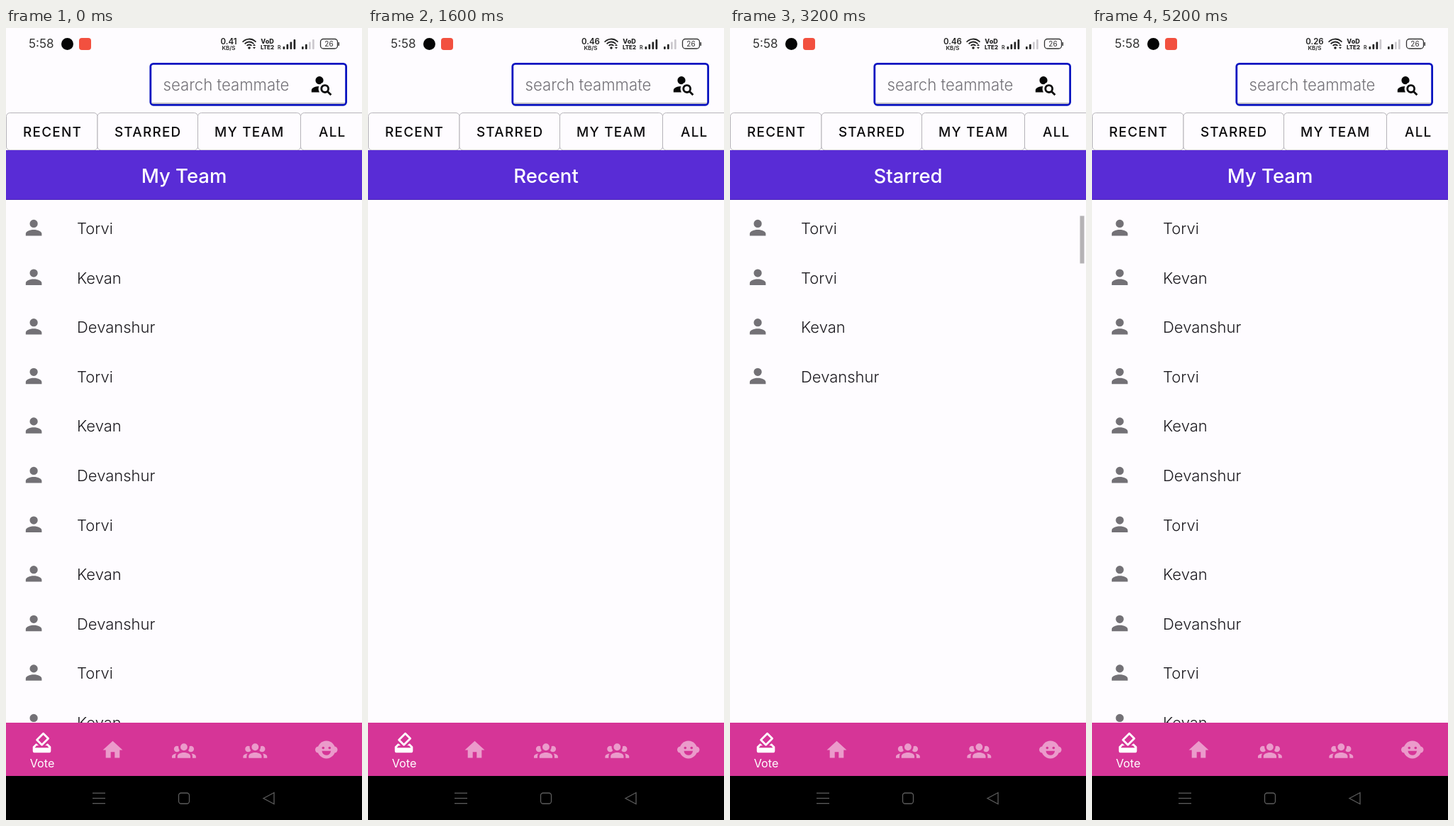
An HTML page with a canvas for the animation above (5.3 s loop, 502 by 1115 pixels).

```html
<!DOCTYPE html>
<html lang="en">
<head>
<meta charset="utf-8">
<title>Team list</title>
<style>
html, body { margin: 0; width: 100%; height: 100%; overflow: hidden; background: #fefcff; }
canvas { display: block; width: 502px; height: 1115px; }
</style>
</head>
<body>
<canvas id="stage"></canvas>
<script>
const W = 502, H = 1115, LOOP = 5300;
const TOP = 172, BOTTOM = 978, ROW = 69.6;
const PAPER = '#fefcff', PINK = '#d63597', PALE = '#eb9bcb';
const FONT = 'Inter, Roboto, sans-serif';

const canvas = document.getElementById('stage');
const ctx = canvas.getContext('2d');
const dpr = window.devicePixelRatio || 1;
canvas.width = W * dpr;
canvas.height = H * dpr;

const icons = {
  person: 'M12 4a4 4 0 0 1 0 8a4 4 0 0 1 0-8m0 10c4.42 0 8 1.79 8 4v2H4v-2c0-2.21 3.58-4 8-4Z',
  find: 'M15.5 12C18 12 20 14 20 16.5C20 17.38 19.75 18.21 19.31 18.9L22.39 22L21 23.39L17.88 20.32C17.19 20.75 16.37 21 15.5 21C13 21 11 19 11 16.5C11 14 13 12 15.5 12M15.5 14A2.5 2.5 0 0 0 15.5 19A2.5 2.5 0 0 0 15.5 14M10 4A4 4 0 0 1 14 8C14 8.91 13.69 9.75 13.18 10.43C12.32 10.75 11.55 11.26 10.91 11.9L10 12A4 4 0 0 1 10 4M2 20V18C2 15.88 5.31 14.14 9.5 14C9.18 14.78 9 15.62 9 16.5C9 17.79 9.38 19 10 20Z',
  vote: 'M18 13h-.68l-2 2h1.91L19 17H5l1.78-2h2.05l-2-2H6l-3 3v4a2 2 0 0 0 2 2h14a2 2 0 0 0 2-2v-4l-3-3m-1-5.05l-4.95 4.95l-3.54-3.54l4.95-4.95L17 7.95m-4.24-5.66L6.39 8.66a1 1 0 0 0 0 1.41l4.95 4.95a1 1 0 0 0 1.41 0l6.36-6.36a1 1 0 0 0 0-1.41L14.16 2.3a1 1 0 0 0-1.4-.01Z',
  home: 'M10 20v-6h4v6h5v-8h3L12 3L2 12h3v8Z',
  group: 'M12 5.5A3.5 3.5 0 0 1 12 12.5A3.5 3.5 0 0 1 12 5.5M5 8C5.56 8 6.08 8.15 6.53 8.42C6.38 9.85 6.8 11.27 7.66 12.38C7.16 13.34 6.16 14 5 14A3 3 0 0 1 5 8M19 8A3 3 0 0 1 19 14C17.84 14 16.84 13.34 16.34 12.38C17.2 11.27 17.62 9.85 17.47 8.42C17.92 8.15 18.44 8 19 8M5.5 18.25C5.5 16.18 8.41 14.5 12 14.5C15.59 14.5 18.5 16.18 18.5 18.25V20H5.5ZM0 20V18.5C0 17.11 1.89 15.94 4.45 15.6C3.86 16.28 3.5 17.22 3.5 18.25V20ZM24 20H20.5V18.25C20.5 17.22 20.14 16.28 19.55 15.6C22.11 15.94 24 17.11 24 18.5Z'
};
for (const k in icons) icons[k] = new Path2D(icons[k]);

const names = ['Torvi', 'Kevan', 'Devanshur'];
const sections = [
  { title: 'Recent', rows: 15, lead: 0 },
  { title: 'Starred', rows: 19, lead: 1 },
  { title: 'My Team', rows: 30, lead: 0 }
];
let offset = 0;
for (const s of sections) {
  s.y = offset;
  offset += ROW * (s.rows + 1);
}

const tabs = [
  { label: 'RECENT', x: 0.5, w: 128.5, tx: 24 },
  { label: 'STARRED', x: 129, w: 141.5, tx: 153 },
  { label: 'MY TEAM', x: 270.5, w: 145, tx: 294 },
  { label: 'ALL', x: 415.5, w: 110, tx: 441 }
];

// Each tap: section reached, start of the scroll, moment the scrollbar goes
const taps = [
  { to: 0, start: 1044.2, hide: 1590, touch: [65, 154] },
  { to: 1, start: 2941, hide: 3390, touch: [185, 158] },
  { to: 2, start: 4402.7, hide: 4990 }
];
const GLIDE = 250;

const clamp = v => Math.max(0, Math.min(1, v));
const ease = p => (1 - Math.cos(Math.PI * clamp(p))) / 2;

function scrollAt(t) {
  let y = sections[2].y;
  for (const tap of taps) y += (sections[tap.to].y - y) * ease((t - tap.start) / GLIDE);
  return y;
}

// Part of the list that is mounted, in content pixels
function mounted(t) {
  if (t < 1590) return [1700, Infinity];
  if (t < 2600) return [0, ROW];
  if (t < 2700) return [0, ROW * 11];
  if (t < 3800) return [0, sections[1].y + ROW * 5];
  if (t < 5200) return [0, sections[2].y + ROW * 2];
  return [0, Infinity];
}

function pressAlpha(dt) {
  if (dt < -50 || dt > 180) return 0;
  if (dt < 10) return 0.29 * (dt + 50) / 60;
  if (dt < 70) return 0.29;
  return 0.29 * Math.pow(1 - (dt - 70) / 110, 1.3);
}

function text(str, x, y, size, color, weight = 400, align = 'left', spacing = 0) {
  ctx.font = `${weight} ${size}px ${FONT}`;
  ctx.fillStyle = color;
  ctx.textAlign = align;
  ctx.letterSpacing = spacing + 'px';
  ctx.fillText(str, x, y);
}

function box(x, y, w, h, color) {
  ctx.fillStyle = color;
  ctx.fillRect(x, y, w, h);
}

function round(x, y, w, h, r, fill, stroke, line = 1) {
  ctx.beginPath();
  ctx.roundRect(x, y, w, h, r);
  if (fill) { ctx.fillStyle = fill; ctx.fill(); }
  if (stroke) { ctx.strokeStyle = stroke; ctx.lineWidth = line; ctx.stroke(); }
}

function disc(x, y, r, color) {
  ctx.beginPath();
  ctx.arc(x, y, r, 0, 7);
  ctx.fillStyle = color;
  ctx.fill();
}

function poly(points, color, line) {
  ctx.beginPath();
  points.forEach(p => ctx.lineTo(...p));
  ctx.closePath();
  if (line) { ctx.strokeStyle = color; ctx.lineWidth = line; ctx.stroke(); }
  else { ctx.fillStyle = color; ctx.fill(); }
}

function icon(name, x, y, scale, color) {
  ctx.save();
  ctx.translate(x, y);
  ctx.scale(scale, scale);
  ctx.fillStyle = color;
  ctx.fill(icons[name], 'evenodd');
  ctx.restore();
}

function bars(x, lit) {
  for (let i = 0; i < 4; i++) {
    const h = 4 + i * 3.3;
    round(x + i * 5, 30 - h, 2.7, h, 1, i < lit ? '#222' : '#ccc9ce');
  }
}

function drawStatus(t) {
  text('5:58', 32, 28, 17, '#333');
  disc(86.5, 22.5, 8.5, '#050505');
  round(103, 14, 17, 17, 4, '#f2503f');
  const rate = t < 1600 ? '0.41' : t < 3600 ? '0.46' : '0.26';
  text(rate, 314, 22.5, 11.5, '#222', 600, 'center');
  text('KB/S', 314, 30.5, 8, '#222', 600, 'center');

  ctx.strokeStyle = '#222';
  ctx.lineWidth = 1.8;
  for (const r of [4.5, 8.5, 12.5]) {
    ctx.beginPath();
    ctx.arc(343, 28, r, -Math.PI * 0.77, -Math.PI * 0.23);
    ctx.stroke();
  }
  disc(343, 28, 1.8, '#222');
  poly([[348, 25], [350, 22.5], [352, 25]], '#222');
  poly([[348, 27], [350, 29.5], [352, 27]], '#222');

  text('VoD', 368.5, 22, 9, '#222', 800, 'center');
  text('LTE2', 368.5, 30, 8, '#222', 800, 'center');
  text('R', 383, 30, 7, '#222', 600);
  bars(390.5, t < 4500 ? 4 : 3);
  bars(417, 2);
  round(443.5, 15.5, 24, 13.5, 4, null, '#333', 1.3);
  round(468.5, 20, 1.5, 5, 0.5, '#333');
  text('26', 455.5, 26, 10, '#333', 400, 'center');
}

function drawSearch() {
  round(203.8, 50.3, 275.8, 58, 4, PAPER, '#0a14c0', 2.8);
  box(205.5, 105.5, 272.5, 1, '#85838c');
  text('search teammate', 221.5, 87.5, 22.2, '#737177', 300);
  icon('find', 428, 62.5, 1.4, '#080808');
}

function drawTabs(t) {
  for (const tab of tabs) round(tab.x, 119.5, tab.w, 52.5, 5, PAPER, '#b5b3b8');
  for (const tap of taps) {
    const a = tap.touch ? pressAlpha(t - tap.start) : 0;
    const tab = tabs[tap.to];
    if (a > 0) round(tab.x, 119.5, tab.w, 52.5, 5, `rgba(0,0,0,${a})`);
  }
  for (const tab of tabs) text(tab.label, tab.tx, 153, 18.9, '#0c0b0d', 500, 'left', 1.25);
}

function drawHeader(title, y) {
  box(0, y, W, 70, '#592cd6');
  box(0, y + 69, W, 1, '#4a25b4');
  text(title, W / 2, y + 46, 27.5, '#fff', 500, 'center');
}

function drawList(t) {
  const pos = scrollAt(t), [lo, hi] = mounted(t);
  ctx.save();
  ctx.beginPath();
  ctx.rect(0, TOP, W, BOTTOM - TOP);
  ctx.clip();
  for (const s of sections) {
    for (let i = 0; i < s.rows; i++) {
      const at = s.y + ROW * (i + 1), y = TOP + at - pos;
      if (at < lo || at + ROW > hi + 1 || y < TOP - 30 || y > BOTTOM) continue;
      const name = names[i < s.lead ? 0 : (i - s.lead) % 3];
      icon('person', 22.2, y + 22.6, 1.41, '#737176');
      text(name, 100, y + 48.4, 22, '#1d1b20', 300);
    }
  }
  sections.forEach((s, k) => {
    let y = TOP + s.y - pos;
    if (y < TOP) {
      const next = sections[k + 1];
      y = next ? Math.min(TOP, TOP + next.y - pos - ROW) : TOP;
    }
    if (y > TOP - ROW && y < BOTTOM) drawHeader(s.title, y);
  });
  if (taps.some(p => t > p.start && t < p.hide)) {
    box(493.5, TOP + scrollAt(t - 7) / 12.04, 6, 67, 'rgba(0,0,0,.29)');
  }
  ctx.restore();
}

function drawTouch(t) {
  for (const { touch, start } of taps) {
    const dt = t - start;
    if (!touch || dt < -50 || dt > 90) continue;
    disc(...touch, 15, 'rgba(255,255,255,.17)');
    ctx.strokeStyle = 'rgba(255,255,255,.12)';
    ctx.lineWidth = 1.5;
    ctx.stroke();
  }
}

function drawNav() {
  box(0, BOTTOM, W, 75, PINK);
  icon('vote', 33.5, 989, 1.42, '#fff');
  text('Vote', 51, 1041, 16.2, '#fff', 400, 'center');
  icon('home', 133.7, 999.6, 1.4, PALE);
  icon('group', 234, 999.5, 1.41, PALE);
  icon('group', 334.4, 999.5, 1.41, PALE);

  disc(440.5, 1016, 4.5, PALE);
  disc(463, 1016, 4.5, PALE);
  disc(451.8, 1016, 12.5, PALE);
  disc(447.3, 1013.5, 1.8, PINK);
  disc(456.3, 1013.5, 1.8, PINK);
  ctx.beginPath();
  ctx.arc(451.8, 1017.5, 6.3, 0.05, Math.PI - 0.05);
  ctx.fillStyle = PINK;
  ctx.fill();

  box(0, 1053, W, 62, '#000');
  for (const y of [1076.5, 1083.8, 1091]) box(122, y, 18, 1.3, '#5c5c5c');
  round(243.5, 1077, 15, 15, 3.5, null, '#5c5c5c', 1.3);
  poly([[363, 1084.5], [378, 1076.5], [378, 1092.5]], '#5c5c5c', 1.3);
}

function draw(t) {
  ctx.setTransform(dpr, 0, 0, dpr, 0, 0);
  box(0, 0, W, H, PAPER);
  drawStatus(t);
  drawSearch();
  drawTabs(t);
  drawList(t);
  drawTouch(t);
  drawNav();
}

let began = null;
function tick(now) {
  if (began === null) began = now;
  draw((now - began) % LOOP);
  requestAnimationFrame(tick);
}
draw(0);
requestAnimationFrame(tick);
</script>
</body>
</html>
```
